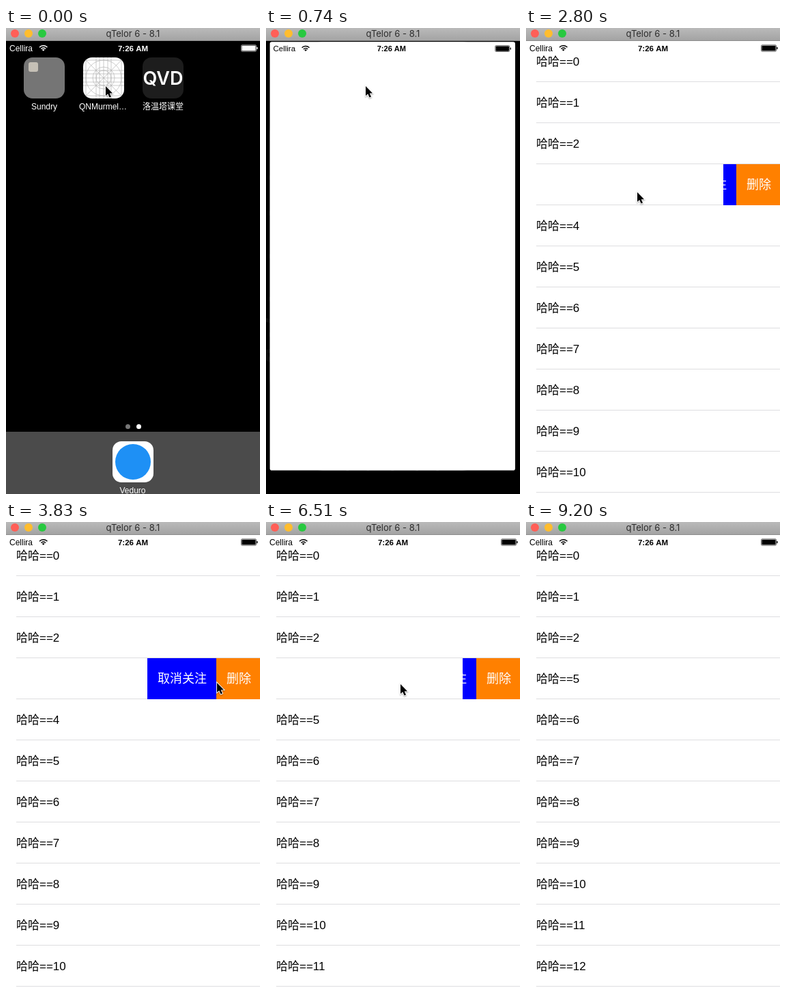
These frames come from a looping animation (372x681 px, 9800 ms). An HTML page with a canvas:

```html
<!DOCTYPE html>
<html lang="zh-CN">
<head>
<meta charset="utf-8">
<style>
html, body { margin: 0; width: 372px; height: 681px; overflow: hidden; background: #000; }
canvas { display: block; }
</style>
</head>
<body>
<canvas id="stage" width="372" height="681"></canvas>
<script>
const c = document.getElementById('stage').getContext('2d');
const LOOP = 9800, SCREEN_W = 375, SCREEN_H = 667, TOP = 19, ROW = 60;
const SANS = '"Liberation Sans", "Noto Sans CJK SC", "Noto Sans CJK", sans-serif';

// Tracks: [step, value, ...], linear in between
const POINTER = [
  [0, 146, 85], [6, 146, 85], [10, 179, 206], [14, 246, 242], [16, 244, 241], [17, 228, 241],
  [19, 163, 240], [20, 115, 240], [21, 96, 240], [22, 225, 238], [23, 333, 235], [24, 335, 235],
  [25, 335, 235], [28, 258, 236], [29, 258, 236], [32, 323, 231], [40, 323, 231],
  [42, 276, 236], [44, 197, 237], [45, 145, 238], [46, 240, 238], [47, 328, 237],
  [48, 262, 236], [50, 262, 236], [51, 330, 236], [57, 330, 240], [61, 350, 645], [62, 352, 700]
];
const SWIPE = [
  [0, 0], [16, 0], [17, 18], [19, 86], [20, 138], [21, 168], [34, 168], [35, 0],
  [41, 0], [42, 10], [44, 87], [45, 140], [46, 168], [56, 168], [57, 0]
];
const LAUNCH = [[2, 0], [3, .12], [4, .58], [5, .95], [6, 1]];
const BAR = [[7, 0], [9, 1], [13, 1], [14, .5], [15, .5], [16, 0]];

function at(track, k) {
  const i = track.findIndex(p => p[0] >= k);
  if (i < 0) return track[track.length - 1].slice(1);
  if (i === 0) return track[0].slice(1);
  const a = track[i - 1], b = track[i], u = (k - a[0]) / (b[0] - a[0]);
  return a.slice(1).map((v, j) => v + (b[j + 1] - v) * u);
}

function layer(draw, alpha = 1) {
  c.save();
  c.globalAlpha *= alpha;
  draw();
  c.restore();
}

function rect(x, y, w, h, color, r = 0) {
  c.fillStyle = color;
  c.beginPath();
  c.roundRect(x, y, w, h, r);
  c.fill();
}

function disc(x, y, r, color) {
  c.fillStyle = color;
  c.beginPath();
  c.arc(x, y, r, 0, 7);
  c.fill();
}

function text(s, x, y, size, color, align = 'left', weight = '', family = SANS) {
  c.font = `${weight} ${size}px ${family}`;
  c.fillStyle = color;
  c.textAlign = align;
  c.fillText(s, x, y);
}

function titleBar() {
  const g = c.createLinearGradient(0, 0, 0, TOP);
  g.addColorStop(0, '#bababa');
  g.addColorStop(1, '#a2a2a2');
  rect(0, 0, 372, TOP, g);
  rect(0, 18, 372, 1, '#8c8c8c');
  ['#ff5f57', '#ffbd2e', '#28c940'].forEach((color, i) => disc(13 + 20 * i, 8, 6, color));
  text('qTelor 6 - 8.1', 186, 13, 13, '#2c2c2c', 'center', '', 'Inter, sans-serif');
}

function statusBar(color) {
  text('Cellira', 5, 33.5, 12, color);
  text('7:26 AM', 186, 33.5, 11.5, color, 'center', 'bold');
  c.strokeStyle = color;
  c.lineWidth = 1.5;
  for (const r of [4.5, 7.8]) {
    c.beginPath();
    c.arc(54.7, 33.5, r, -Math.PI * .76, -Math.PI * .24);
    c.stroke();
  }
  c.fillStyle = color;
  c.beginPath();
  c.moveTo(54.7, 33.8);
  c.arc(54.7, 33.5, 2.6, -Math.PI * .76, -Math.PI * .24);
  c.fill();
  c.lineWidth = .6;
  c.beginPath();
  c.roundRect(344.5, 24.8, 22, 9.4, 1.5);
  c.stroke();
  rect(345.4, 25.7, 20.2, 7.6, color, 1);
  rect(367.2, 27.8, 1.4, 3.4, color, .7);
}

// Template icon in a 60 x 60 box at the current origin
function gridIcon(pressed) {
  c.beginPath();
  c.roundRect(0, 0, 60, 60, 13);
  c.clip();
  rect(0, 0, 60, 60, '#fff');
  c.strokeStyle = '#a9a9a9';
  c.lineWidth = .6;
  c.beginPath();
  for (const p of [4, 19, 24, 30, 36, 41, 56]) {
    c.moveTo(p, 0); c.lineTo(p, 60);
    c.moveTo(0, p); c.lineTo(60, p);
  }
  c.moveTo(0, 0); c.lineTo(60, 60);
  c.moveTo(60, 0); c.lineTo(0, 60);
  for (const r of [11, 16, 26]) {
    c.moveTo(30 + r, 30);
    c.arc(30, 30, r, 0, 7);
  }
  c.stroke();
  if (pressed) rect(0, 0, 60, 60, 'rgba(0,0,0,.45)');
}

function home(pressed) {
  rect(26, 43, 60, 60, '#757575', 13);
  rect(33, 50, 14, 14, '#c5c0b6', 3);
  layer(() => { c.translate(113, 43); gridIcon(pressed); });
  rect(200, 43, 60, 60, '#1d1d1d', 13);
  text('QVD', 230, 83, 27, '#fff', 'center', 600, 'Inter, sans-serif');
  const label = (s, x, y) => text(s, x, y, 12, '#fff', 'center');
  label('Sundry', 56, 119);
  label('QNMurmel…', 142, 119);
  label('洛温塔课堂', 230, 119);
  disc(178.5, 582.5, 3.5, '#777');
  disc(194.5, 582.5, 3.5, '#fff');
  rect(0, 590, 375, 96, '#4b4b4b');
  rect(156, 604, 60, 60, '#fff', 13);
  disc(186, 634, 26, '#1e90f5');
  label('Veduro', 185.5, 680);
}

function launch(k) {
  const [p] = at(LAUNCH, k);
  const x = 113 * (1 - p), y = 43 + (TOP - 43) * p;
  const w = 60 + (SCREEN_W - 60) * p, h = 60 + (SCREEN_H - 60) * p ** 1.35;
  const fade = Math.max(0, 1 - p);
  layer(() => {
    c.translate(x, y);
    c.scale(w / 60, w / 60);
    c.translate(-113, -43);
    home(true);
  }, fade);
  layer(() => statusBar('#fff'), fade);
  layer(() => {
    c.translate(x, y);
    c.scale(w / 60, h / 60);
    gridIcon(true);
  });
  layer(() => {
    c.translate(x, y);
    c.scale(w / SCREEN_W, h / SCREEN_H);
    c.translate(0, -TOP);
    rect(0, TOP, SCREEN_W, SCREEN_H, '#fff', 3);
    statusBar('#000');
  }, Math.min(1, p * 1.66));
}

function actions(k, open) {
  const bluePress = k === 28 || k === 29 || (k >= 48 && k < 51);
  const orangePress = k >= 32 && k < 35 || k >= 51;
  layer(() => {
    c.beginPath();
    c.rect(SCREEN_W - open, 199, open, ROW);
    c.clip();
    rect(206, 199, 102, ROW, bluePress ? '#0000dc' : '#00f');
    rect(308, 199, 67, ROW, orangePress ? '#e67300' : '#ff8000');
    text('取消关注', 258, 235, 18, '#fff', 'center');
    text('删除', 341, 235, 18, '#fff', 'center');
  });
}

function list(k) {
  rect(0, TOP, 372, 662, '#fff');
  const gone = k < 35 ? 0 : k < 57 ? 1 : 2;
  const [open] = at(SWIPE, k);
  for (let i = 0; i < 11; i++) {
    const y = TOP + ROW * i, n = i < 3 ? i : i + gone;
    text('哈哈==' + n, 15 - (i === 3 ? open : 0), y + 36, 17, '#000');
    rect(15, y + 59, 357, 1, '#dedee0');
  }
  if (open) actions(k, open);
  statusBar('#000');
  layer(() => rect(368.5, 22, 3, 388, '#b3b3b3', 1.5), at(BAR, k)[0]);
}

function pointer(k) {
  const [x, y] = at(POINTER, k);
  layer(() => {
    c.translate(Math.round(x), Math.round(y));
    c.beginPath();
    [[0, 0], [0, 14], [3.2, 11.2], [5.6, 16.6], [8, 15.5], [5.7, 10.4], [10, 10.2]]
      .forEach(p => c.lineTo(...p));
    c.closePath();
    c.shadowColor = 'rgba(0,0,0,.35)';
    c.shadowBlur = 2;
    c.shadowOffsetY = 1;
    c.lineWidth = 1.8;
    c.strokeStyle = '#fff';
    c.stroke();
    c.shadowColor = 'transparent';
    c.fillStyle = '#000';
    c.fill();
  });
}

const stepAt = t => Math.floor((t + 4) / (146.6 + t * .00019));

function draw(t) {
  const k = stepAt(t);
  rect(0, 0, 372, 681, '#000');
  if (k < 3) {
    home(k > 0);
    statusBar('#fff');
  } else if (k < 7) launch(k);
  else list(k);
  pointer(k);
  titleBar();
}

const start = performance.now();
function tick() {
  draw((performance.now() - start) % LOOP);
  requestAnimationFrame(tick);
}
tick();
</script>
</body>
</html>
```
